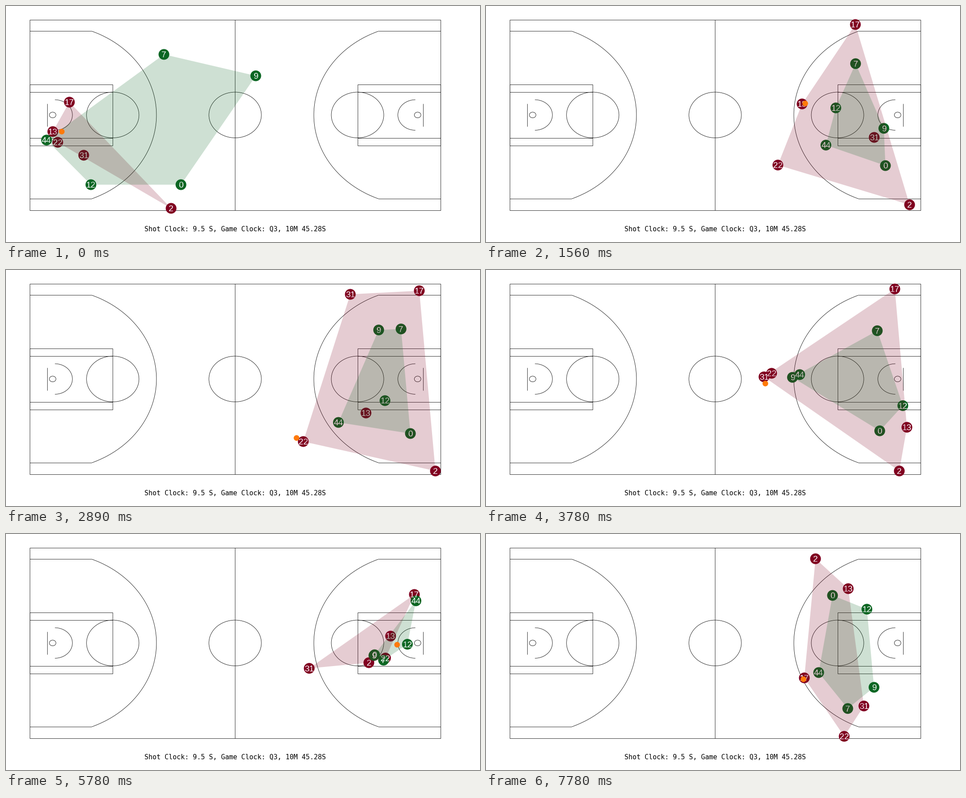
These frames come from a looping animation (1058 by 529 pixels, 8000 ms). A matplotlib script:

```python
import numpy as np
import matplotlib.pyplot as plt
from matplotlib.animation import FuncAnimation
from matplotlib.patches import Circle, Ellipse, Polygon, Rectangle

W, H, DPI = 1058, 529, 64
PX = 72 / DPI  # one pixel in points

# The picture advances in whole steps, drawn on a finer tick
LOOP_MS, TICK_MS, STEPS = 8000, 40, 36
STEP_MS = LOOP_MS / STEPS

GREEN, RED, ORANGE = "#0b6623", "#800020", "#ff7a0a"

# Court geometry: feet to pixels
LEFT, RIGHT, TOP, BOTTOM = 52.9, 970, 30.8, 457.8
FX, FY = (RIGHT - LEFT) / 94, (BOTTOM - TOP) / 50
MID_X, MID_Y = (LEFT + RIGHT) / 2, (TOP + BOTTOM) / 2

# Attackers and ball run through these poses
KEYS = np.array([0, 7, 13, 17, 23, 30, 35])
ATTACK = {
    2: [(368, 453), (945, 445), (958, 450), (922, 450), (880, 437), (727, 63), (735, 55)],
    13: [(104, 281), (705, 219), (803, 320), (939, 352), (897, 284), (815, 158), (808, 122)],
    17: [(141, 215), (824, 41), (922, 46), (912, 42), (917, 52), (888, 280), (710, 322)],
    22: [(115, 305), (651, 356), (663, 384), (637, 231), (882, 150), (792, 474), (799, 453)],
    31: [(173, 334), (866, 294), (768, 54), (620, 239), (617, 301), (794, 300), (843, 385)],
}
BALL = [(124, 281), (712, 218), (648, 376), (623, 254), (917, 117), (774, 449), (708, 325)]

# Each defender starts upcourt, then marks a man (two of them swap men midway)
# and sags off him towards a help spot, further when the ball is far away.
HOOP = (RIGHT - 5.25 * FX, MID_Y)
PAINT = (825, 250)
DEFEND = {  # start, man early, man late, help spot
    0: ((390, 400), 2, 2, PAINT),
    7: ((352, 108), 17, 22, PAINT),
    9: ((557, 156), 31, 31, HOOP),
    12: ((189, 400), 13, 13, HOOP),
    44: ((90, 300), 22, 17, HOOP),
}
SAG_NEAR = [0.35, 0.3, 0.2, 0.1, 0.12, 0.15]
SAG_FAR = [0.45, 0.42, 0.45, 0.6, 0.65, 0.45]
SWAP = 3


def defender_points(start, early, late, spot):
    points = [start]
    for k, (near, far) in enumerate(zip(SAG_NEAR, SAG_FAR)):
        man = np.array(ATTACK[early if k < SWAP else late][k + 1])
        gap = np.hypot(*(man - BALL[k + 1]))
        sag = near + (far - near) * min(gap / 300, 1)
        points.append(man + sag * (spot - man))
    return points


def smooth(t, v, at):
    """Monotone cubic interpolation."""
    h = np.diff(t)
    d = np.diff(v) / h
    prod = d[:-1] * d[1:]
    total = np.where(prod > 0, d[:-1] + d[1:], 1)
    m = np.r_[d[0], np.where(prod > 0, 2 * prod / total, 0), d[-1]]
    i = np.clip(np.searchsorted(t, at, side="right") - 1, 0, len(h) - 1)
    u = (at - t[i]) / h[i]
    return (v[i] * (1 + 2 * u) * (1 - u) ** 2 + v[i + 1] * u**2 * (3 - 2 * u)
            + h[i] * (m[i] * u * (1 - u) ** 2 - m[i + 1] * u**2 * (1 - u)))


def track(points):
    steps = np.arange(STEPS)
    # half a pixel moves pixel indices to pixel centres
    return np.column_stack([smooth(KEYS, v, steps) + 0.5 for v in np.array(points, float).T])


def hull(points):
    pts = sorted(map(tuple, points))

    def chain(seq):
        out = []
        for x, y in seq:
            while len(out) > 1:
                (x0, y0), (x1, y1) = out[-2:]
                if (x1 - x0) * (y - y0) > (y1 - y0) * (x - x0):
                    break
                out.pop()
            out.append((x, y))
        return out[:-1]

    return chain(pts) + chain(pts[::-1])


fig = plt.figure(figsize=(W / DPI, H / DPI), dpi=DPI, facecolor="white")
ax = fig.add_axes([0, 0, 1, 1])
ax.set_xlim(0, W)
ax.set_ylim(H, 0)
ax.axis("off")

WEIGHT = 0.8 * PX
PEN = dict(fill=False, edgecolor="black", linewidth=WEIGHT, zorder=1)


def line(x, y):
    ax.plot(x, y, color="black", lw=WEIGHT, zorder=1, solid_capstyle="butt")


def ring(x, feet):
    ax.add_patch(Ellipse((x, MID_Y), 2 * feet * FX, 2 * feet * FY, **PEN))


def arc(x, feet, half_angle, flip):
    a = np.linspace(-half_angle, half_angle, 181)
    line(x + flip * feet * FX * np.cos(a), MID_Y + feet * FY * np.sin(a))


def half_court(edge, flip):
    def at(feet):
        return edge + flip * feet * FX

    corner = np.arcsin(22 / 23.75)
    for side in (-1, 1):
        line([edge, at(5.25 + 23.75 * np.cos(corner))], [MID_Y + side * 22 * FY] * 2)
        line([edge, at(19)], [MID_Y + side * 6 * FY] * 2)
    arc(at(5.25), 23.75, corner, flip)
    arc(at(5.77), 4, np.pi / 2, flip)
    ax.add_patch(Rectangle((edge, MID_Y - 8 * FY), flip * 19 * FX, 16 * FY, **PEN))
    line([at(4)] * 2, [MID_Y - 3 * FY, MID_Y + 3 * FY])
    ring(at(19), 6)
    ring(at(5.25), 0.75)


ax.add_patch(Rectangle((LEFT, TOP), RIGHT - LEFT, BOTTOM - TOP, **PEN))
line([MID_X] * 2, [TOP, BOTTOM])
ring(MID_X, 6)
half_court(LEFT, 1)
half_court(RIGHT, -1)

ax.text(MID_X, 505, "Shot Clock: 9.5 S, Game Clock: Q3, 10M 45.28S",
        family="DejaVu Sans Mono", size=15 * PX, ha="center", va="baseline")


def disc(radius, color, z):
    return ax.add_patch(Circle((0, 0), radius, facecolor=color, linewidth=0, zorder=z))


def make_team(roster, color, order):
    players = []
    for number, points in roster.items():
        label = ax.text(0, 0, str(number), color="white", family="Liberation Sans",
                        size=19 * PX, ha="center", va="baseline", zorder=3)
        players.append((disc(12, color, 2 + order / 10), label, track(points)))
    area = ax.add_patch(Polygon([(0, 0), (1, 0), (0, 1)], facecolor=color, alpha=0.2,
                                linewidth=0, zorder=4 + order))
    return players, area


defence = {number: defender_points(*role) for number, role in DEFEND.items()}
teams = [make_team(ATTACK, RED, 0), make_team(defence, GREEN, 1)]
ball = disc(6.3, ORANGE, 6)
ball_track = track(BALL)


def draw(tick):
    step = int(((tick + 1) * TICK_MS - 1) / STEP_MS)
    for players, area in teams:
        for dot, label, path in players:
            x, y = path[step]
            dot.center = x, y
            label.set_position((x, y + 6.5))
        area.set_xy(hull(path[step] for _, _, path in players))
    ball.center = tuple(ball_track[step])
    return []


anim = FuncAnimation(fig, draw, frames=LOOP_MS // TICK_MS, interval=TICK_MS,
                     repeat=True, repeat_delay=0, blit=False)
plt.show()
```
